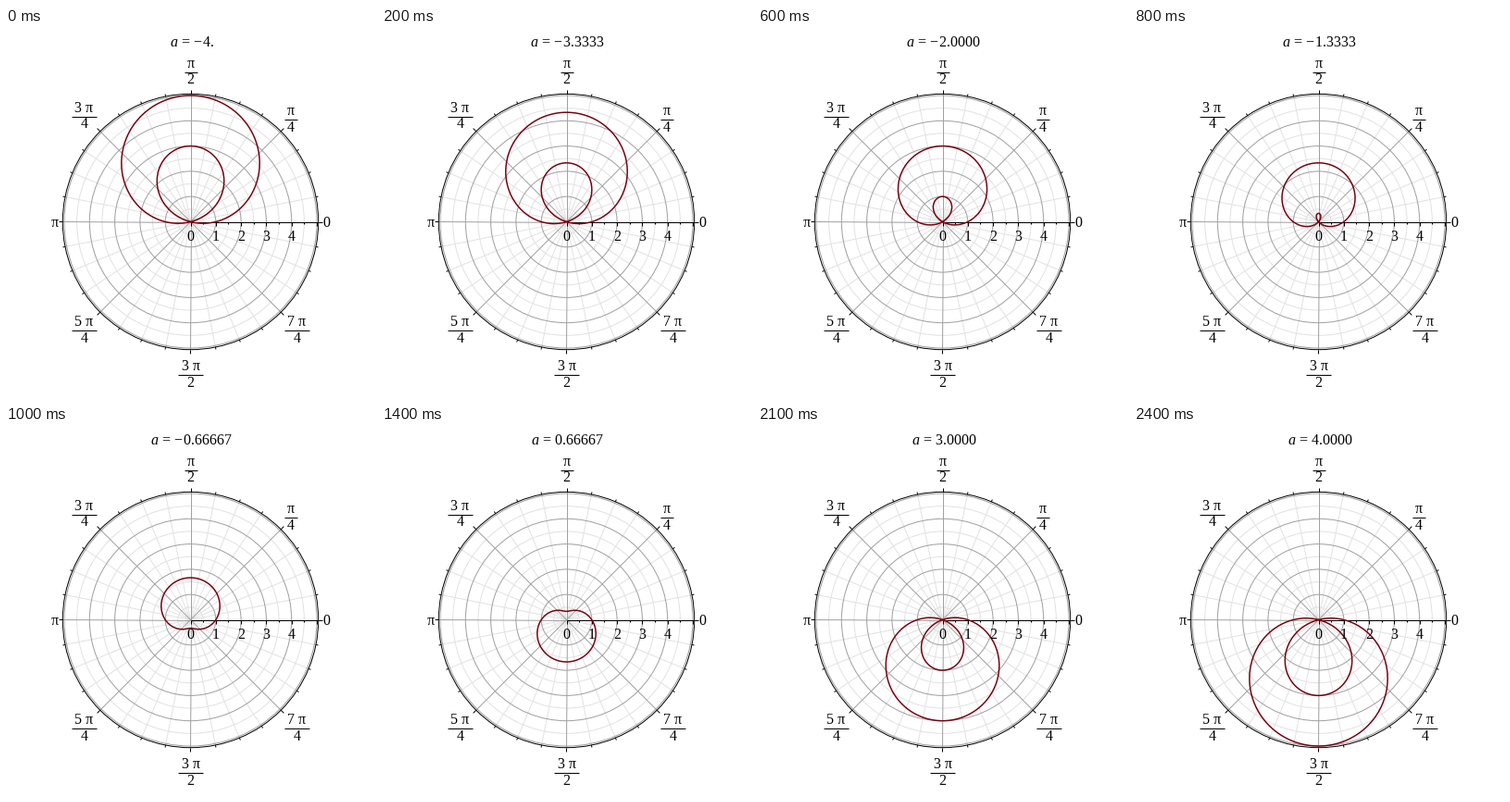
Write a matplotlib script that moves like this. It is 400 by 400 pixels and loops after 2.5 s.

```python
import numpy as np
import matplotlib.pyplot as plt
from matplotlib.animation import FuncAnimation
from matplotlib.patches import Circle

plt.rcParams.update({
    "font.family": "Liberation Serif",
    "mathtext.fontset": "custom",
    "mathtext.rm": "Liberation Serif",
    "mathtext.it": "Liberation Serif:italic",
    "mathtext.default": "regular",
})

SIZE, DPI = 400, 100
PT = 72 / DPI                 # points per pixel
CX, CY = 199.5, 209.5
UNIT, RIM = 27.3, 138.2
FRAMES = 25
MAJOR, MINOR, CURVE = "#a0a0a0", "#e2e2e2", "#78000e"

fig = plt.figure(figsize=(SIZE / DPI, SIZE / DPI), dpi=DPI, facecolor="white")
ax = fig.add_axes([0, 0, 1, 1])
ax.set_xlim(0, SIZE)
ax.set_ylim(SIZE, 0)
ax.axis("off")


def line(xs, ys, color="black", width=1.0, z=1):
    return ax.plot(xs, ys, color=color, lw=width * PT, zorder=z,
                   solid_capstyle="butt")[0]


def ray(angle, r0, r1, color, z):
    r = np.array([r0, r1])
    line(CX + r * np.cos(angle), CY - r * np.sin(angle), color, z=z)


def ring(radius, color, z):
    ax.add_patch(Circle((CX, CY), radius, fill=False, ec=color, lw=PT, zorder=z))


def label(x, baseline, s):
    return ax.text(x, baseline, s, fontsize=16 * PT, ha="center",
                   va="baseline", zorder=6)


def fraction(x, y, top, bottom, half):
    label(x, y - 4.5, top)
    line([x - half, x + half], [y, y], z=6)
    label(x, y + 13, bottom)


# Polar grid and rim ticks
for k in range(32):
    main = k % 4 == 0
    angle = k * np.pi / 16
    ray(angle, 0, RIM, MAJOR if main else MINOR, 2 if main else 1)
    ray(angle, RIM, RIM + (4.5 if main else 2.5), "black", 3)
for k in range(1, 11):
    main = k % 2 == 0
    ring(k * UNIT / 2, MAJOR if main else MINOR, 2 if main else 1)
ring(RIM, "black", 3)

# Radial axis
line([CX, CX + RIM], [CY, CY], z=3)
for k in range(11):
    x = CX + k * UNIT / 2
    line([x, x], [CY, CY + (4.5 if k % 2 == 0 else 2.5)], z=3)
for k in range(5):
    label(CX + k * UNIT, 230, str(k))

# Angle labels
label(346, 215, "0")
label(52.5, 215, "π")
fraction(199.5, 47.5, "π", "2", 7)
fraction(308, 98.5, "π", "4", 7)
fraction(84.5, 95.5, "3 π", "4", 13.5)
fraction(84.5, 326.5, "5 π", "4", 13.5)
fraction(314.5, 326.5, "7 π", "4", 13.5)
fraction(199.5, 374.5, "3 π", "2", 13.5)

theta = np.linspace(0, 2 * np.pi, 401)
curve = line([], [], CURVE, 1.5, 4)
curve.set_solid_joinstyle("round")
title = label(200.7, 20, "")


def caption(i, a):
    if i == 0 or a == 0:
        value = f"{a:.0f}."
    else:
        value = f"{a:#.5g}"
    return r"$\mathit{a}$ = " + value.replace("-", r"−$\hspace{0.125}$")


def update(i):
    a = (i - 12) / 3
    r = UNIT * (1 - a * np.sin(theta))
    curve.set_data(CX + r * np.cos(theta), CY - r * np.sin(theta))
    title.set_text(caption(i, a))
    return curve, title


anim = FuncAnimation(fig, update, frames=FRAMES, interval=100,
                     repeat=True, repeat_delay=0, blit=False)
plt.show()
```
